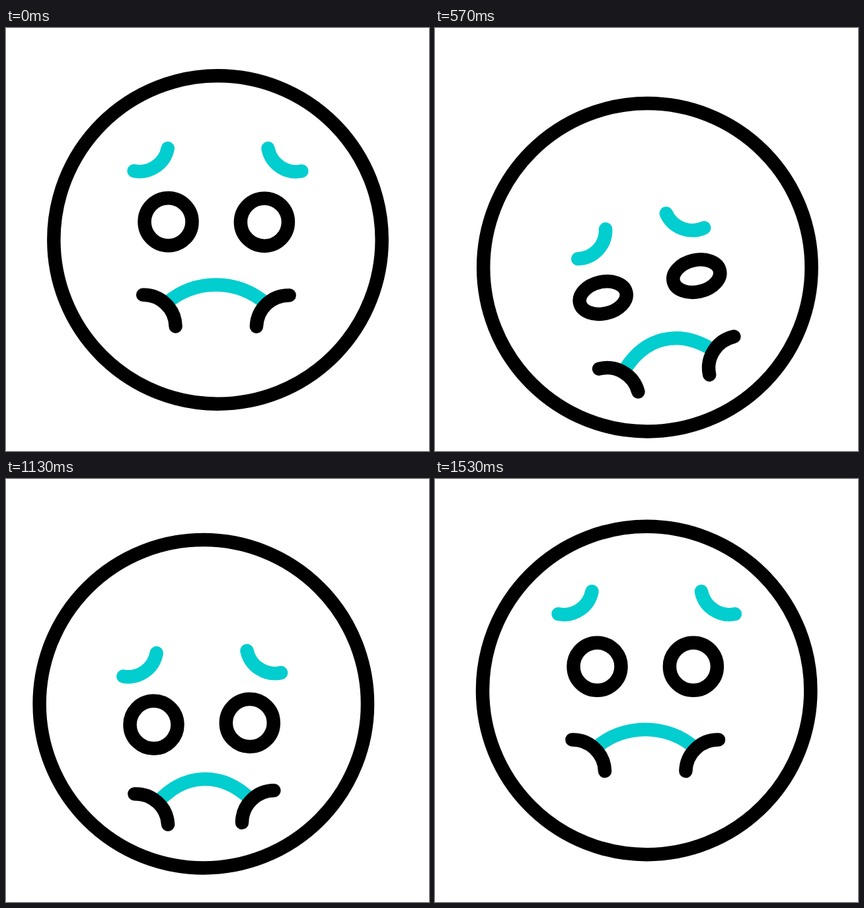
Animation, 640 px wide and 640 px high, one loop 1670 ms. Source, as an HTML page:

```html
<!DOCTYPE html>
<html lang="en">
<head>
<meta charset="utf-8">
<title>Queasy face</title>
<style>
  html, body { margin: 0; width: 100%; height: 100%; overflow: hidden; background: #fff; }
  svg { display: block; width: 100vw; height: 100vh; }
  svg * { fill: none; stroke-width: 20.5; stroke-linecap: round; }
  .ink { stroke: #000; }
  .teal { stroke: #02cdcf; }
</style>
</head>
<body>
<svg viewBox="0 0 640 640">
  <circle id="head" class="ink" r="248.2"/>
  <g id="features">
    <path id="browL" class="teal" d="M-133.7-79.5A43.3 43.3 0 0 0-82.7-113.8"/>
    <path id="browR" class="teal" d="M133.7-79.5A43.3 43.3 0 0 1 82.7-113.8"/>
    <ellipse id="eyeL" class="ink" cx="-72.7" rx="36"/>
    <ellipse id="eyeR" class="ink" cx="72.7" rx="36"/>
    <g id="mouth">
      <path id="lip" class="teal"/>
      <path id="cheekL" class="ink" d="M-110.8 110.7A48.8 48.8 0 0 1-61.2 158.2"/>
      <path id="cheekR" class="ink" d="M110.8 110.7A48.8 48.8 0 0 0 61.2 158.2"/>
    </g>
  </g>
</svg>
<script>
const LOOP = 1670, LAST = 46, FPS = 30;
const el = id => document.getElementById(id);
const clamp = u => Math.min(1, Math.max(0, u));

// Sine ease from 0 to 1 between steps a and b; power > 1 delays the start.
const ease = (s, a, b, power = 1) => (1 - Math.cos(Math.PI * clamp((s - a) / (b - a)) ** power)) / 2;

// Swings between turning points given as [step, value].
const swing = (s, ...turns) => turns.reduce((sum, [t, v], i) =>
  i ? sum + (v - turns[i - 1][1]) * ease(s, turns[i - 1][0], t) : v, 0);

const headX = s => swing(s, [-1, 320.2], [10, 335.5], [28.5, 290.5], [44, 320.2]);
const headY = s => 320 + 42.3 * (ease(s, -1, 14) - ease(s, 14, 44, 1.64));
const tilt = s => swing(s, [-1, 0], [11, 10.6], [17, -13.1], [26, 8.2], [39, -5.5], [46, 0]);
const gag = s => swing(s, [-1, 0], [15, 0.48], [23, 1], [29, 0], [39, 1], [46, 0]);
const drop = s => 66.4 * clamp(Math.min((s + 1) / 7.2, (45.3 - s) / 7.6));
const frown = s => Math.max(0, Math.min(6.85 * (s + 1), 1.24 * (45.5 - s)));
const lid = s => 36 - 12 * clamp(1 - Math.abs(s - 17) / 3);

const move = (id, x, y, rest = "") => el(id).setAttribute("transform", `translate(${x} ${y})${rest}`);

function draw(ms) {
  const s = Math.min(LAST, Math.floor((ms % LOOP + 3.4) * FPS / 1000));
  const x = headX(s), y = headY(s), d = drop(s), f = frown(s), m = gag(s);

  move("head", x, y);
  move("features", x - 2 - d * 0.018, y - 36.2 + d, ` rotate(${tilt(s)} 0 -30)`);

  move("browL", 2 + f, f * 0.385);
  move("browR", 2 - f, f * 0.315);

  for (const eye of ["eyeL", "eyeR"]) el(eye).setAttribute("ry", lid(s));

  const inset = 10.4 * m, lift = -14.3 * m;
  move("mouth", 3.6 * m, 0, ` rotate(${-0.6 * m} 0 100)`);
  move("cheekL", inset, lift);
  move("cheekR", -inset, lift);

  const end = 76 - inset, base = 124 + lift;
  const ctrl = end - 42 - 2 * m, top = base - (28.8 + 8.7 * m) / 0.75;
  el("lip").setAttribute("d", `M${-end} ${base}C${-ctrl} ${top} ${ctrl} ${top} ${end} ${base}`);
}

let start = null;
function tick(now) {
  if (start === null) start = now;
  draw(Math.max(0, now - start));
  requestAnimationFrame(tick);
}
draw(0);
requestAnimationFrame(tick);
</script>
</body>
</html>
```
